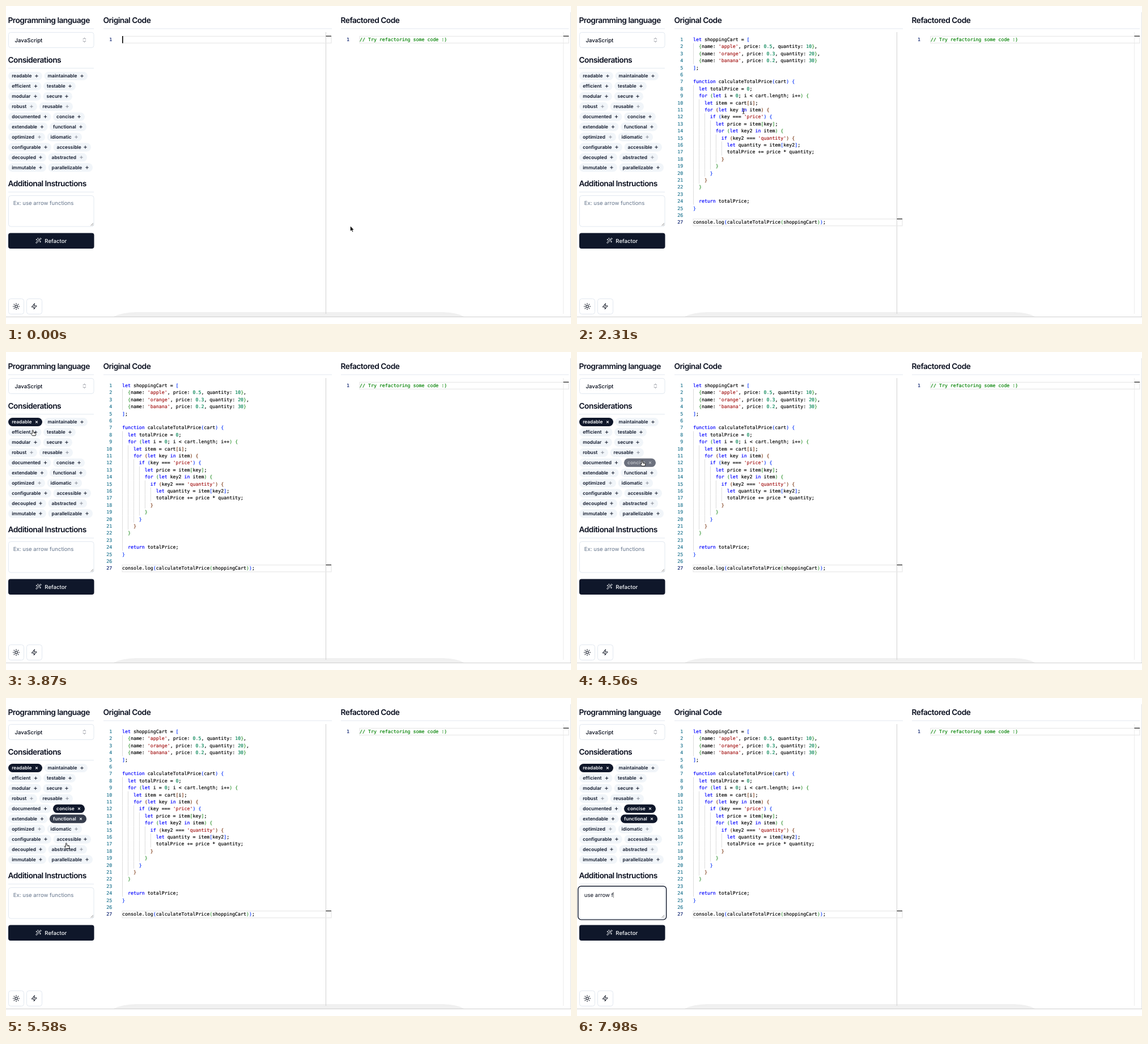
Animation of 997 by 561 pixels, one loop 8 s. Source, as an HTML page:

```html
<!DOCTYPE html>
<html lang="en">
<head>
<meta charset="utf-8">
<title>Code refactoring tool</title>
<style>
  html, body { margin: 0; width: 100%; height: 100%; overflow: hidden; background: #fff; }
  svg { display: block; }
  text { white-space: pre; text-rendering: geometricPrecision; font-family: Inter, sans-serif; }
  .head { font-size: 13.77px; font-weight: 600; letter-spacing: -.038em; fill: #0b1020; }
  .ui { font-size: 9.6px; }
  .medium { font-weight: 500; }
  .chip { font-size: 8.35px; font-weight: 600; }
  .code { font: 8.289px "DejaVu Sans Mono", monospace; font-variant-ligatures: none; }
  .code, .code tspan { fill: currentColor; stroke: currentColor; stroke-width: .18; }
  .icon { fill: none; stroke-width: 2; stroke-linecap: round; stroke-linejoin: round; }
</style>
</head>
<body>
<svg id="stage" width="997" height="561" viewBox="0 0 997 561"></svg>
<script>
const LOOP = 8000, STEP = 12.4, CHAR = 4.99;
const INK = '#0f172a', RULE = '#e2e8f0';
const stage = document.getElementById('stage');

function el(tag, attrs, parent = stage, content) {
  const node = document.createElementNS('http://www.w3.org/2000/svg', tag);
  for (const k in attrs) node.setAttribute(k, attrs[k]);
  if (content !== undefined) node.textContent = content;
  parent.appendChild(node);
  return node;
}
const text = (x, y, str, cls, fill, parent) =>
  el('text', fill ? { x, y, class: cls, fill } : { x, y, class: cls }, parent, str);
const code = (x, y, str, color, parent) =>
  el('text', { x, y, class: 'code', color }, parent, str);
const line = (x1, y1, x2, y2, stroke, w = 1, parent) =>
  el('line', { x1, y1, x2, y2, stroke, 'stroke-width': w }, parent);
const box = (x, y, width, height, rx, fill, stroke = 'none', parent) =>
  el('rect', { x, y, width, height, rx, fill, stroke }, parent);
const icon = (x, y, scale, d, stroke, opacity = 1) =>
  el('path', { d, class: 'icon', stroke, opacity, transform: `translate(${x} ${y}) scale(${scale}) translate(-12 -12)` });
const show = (node, on) => node.setAttribute('visibility', on ? 'visible' : 'hidden');
const smooth = u => { u = Math.min(1, Math.max(0, u)); return u * u * (3 - 2 * u); };
const mix = (a, b, u) => a.map((v, i) => v + (b[i] - v) * u);
const rgb = c => `rgb(${c.map(Math.round)})`;

// Window edges and the dock-like shade at the bottom
el('path', { d: 'M190 548Q205 540.5 230 540H770Q795 540.5 808 548Z', fill: '#f0f0f0' });
line(0, 548.5, 997, 548.5, '#d0d0d0');
line(996.5, 11, 996.5, 548, '#e4e4e4');

// Headings
[['Programming language', 4, 30, 155], ['Original Code', 172, 30, 575],
 ['Refactored Code', 591, 30, 993], ['Considerations', 4, 99.8, 155],
 ['Additional Instructions', 4, 318.2, 155]].forEach(([str, x, y, right]) => {
  text(x - .5, y, str, 'head');
  line(x, y + 10, right, y + 10, RULE);
});

// Language select
box(4.5, 46.5, 150.5, 27, 4, '#fff', RULE);
text(15.5, 63.6, 'JavaScript', 'ui medium', '#020817');
icon(138.3, 60, .459, 'm7 15 5 5 5-5M7 9l5-5 5 5', INK, .6);

// Consideration chips: word and centre of its plus sign, two per row
const words = [
  ['readable', 54, 'maintainable', 134], ['efficient', 52.5, 'testable', 113],
  ['modular', 52, 'secure', 107], ['robust', 45, 'reusable', 108],
  ['documented', 69.5, 'concise', 129], ['extendable', 63.5, 'functional', 132],
  ['optimized', 59, 'idiomatic', 124], ['configurable', 70, 'accessible', 140],
  ['decoupled', 61, 'abstracted', 133], ['immutable', 61, 'parallelizable', 143]];
const faint = ['robust', 'reusable', 'optimized', 'idiomatic', 'abstracted'];
// click time and moment the pointer leaves
const picks = { readable: [3450, 3740], concise: [4460, 4830], functional: [5230, 5540] };
const LIGHT = [241, 245, 249], HOVER = [63, 69, 85], DARK = [15, 23, 42], PALE = [248, 250, 252];
const chips = [];

function addChip(word, left, plus, cy) {
  const right = plus + 10;
  const pill = box(left, cy - 7.6, right - left, 15.2, 7.6, rgb(LIGHT));
  const label = text(left + 6.2, cy + 2.9, word, 'chip', INK);
  const mark = el('path', { d: 'M-2.7 0H2.7M0-2.7V2.7', stroke: INK, 'stroke-width': .95,
    opacity: faint.includes(word) ? .5 : 1 });
  chips.push({ word, left, right, plus, cy, pill, label, mark });
  return right + 3.4;
}
words.forEach(([a, pa, b, pb], i) => {
  const cy = 123.5 + 17.94 * i;
  addChip(b, addChip(a, 4, pa, cy), pb, cy);
});

function drawChip(c, t) {
  const pick = picks[c.word];
  const on = pick && t >= pick[0];
  let bg = LIGHT, fg = DARK;
  if (on) {
    const u = smooth((t - pick[0]) / 150);
    bg = mix(mix(LIGHT, HOVER, u), DARK, smooth((t - pick[1]) / 150));
    fg = mix(DARK, PALE, u);
  }
  c.pill.setAttribute('fill', rgb(bg));
  c.label.setAttribute('fill', rgb(fg));
  c.mark.setAttribute('stroke', rgb(fg));
  c.mark.setAttribute('transform', `translate(${c.plus} ${c.cy})` + (on ? ' rotate(45)' : ''));
}

// Instructions field
const ring = box(1.95, 331.95, 155.7, 59.2, 5.5, 'none', INK);
ring.setAttribute('stroke-width', 1.4);
box(4.5, 334.5, 150.5, 54.5, 4, '#fff', RULE);
el('path', { d: 'M149.5 387.5l4.5-4.5M152 387.5l2-2', stroke: '#666', 'stroke-width': .7 });
const hint = text(12.8, 351, 'Ex: use arrow functions', 'ui', '#64748b');
const typed = text(12.8, 351, '', 'ui', '#020817');
const fieldCaret = box(0, 342.5, .7, 10, 0, '#555');

// Buttons
box(4, 400.4, 151.5, 27.5, 4, INK);
icon(57.3, 414, .459, 'm21.64 3.64-1.28-1.28a1.08 1.08 0 0 0-1.54 0L2.36 18.82a1.08 1.08 0 0 0 0 1.54l1.28 1.28a1.08 1.08 0 0 0 1.54 0L21.64 5.18a1.08 1.08 0 0 0 0-1.54ZM14 7l3 3M5 6v4M19 14v4M10 2v2M7 8H3M21 16h-4M11 3H9', '#f8fafc');
text(68.3, 417.5, 'Refactor', 'ui medium', '#f8fafc');
box(4.5, 516.5, 27, 27, 4, '#fff', RULE);
box(36.5, 516.5, 27, 27, 4, '#fff', RULE);
icon(18, 530, .55, 'M8 12a4 4 0 1 0 8 0a4 4 0 1 0-8 0M12 2v2M12 20v2M4.9 4.9l1.4 1.4M17.7 17.7l1.4 1.4M2 12h2M20 12h2M6.3 17.7l-1.4 1.4M19.1 4.9l-1.4 1.4', '#020817');
icon(49.7, 530, .5, 'M13 2L3 14H12L11 22L21 10H12Z', '#020817');

// Editors
const source = `let shoppingCart = [
  {name: 'apple', price: 0.5, quantity: 10},
  {name: 'orange', price: 0.3, quantity: 20},
  {name: 'banana', price: 0.2, quantity: 30}
];

function calculateTotalPrice(cart) {
  let totalPrice = 0;
  for (let i = 0; i < cart.length; i++) {
    let item = cart[i];
    for (let key in item) {
      if (key === 'price') {
        let price = item[key];
        for (let key2 in item) {
          if (key2 === 'quantity') {
            let quantity = item[key2];
            totalPrice += price * quantity;
          }
        }
      }
    }
  }

  return totalPrice;
}

console.log(calculateTotalPrice(shoppingCart));`.split('\n');
const PAIRS = ['#0431fa', '#319331', '#7b3814'];
const token = /'[^']*'|[A-Za-z_]\w*|\d[\d.]*|[()[\]{}]|\s+|./g;
let depth = 0;

function colour(tok) {
  if (/^(let|function|for|in|if|return)$/.test(tok)) return '#0000ff';
  if (tok[0] === "'") return '#a31515';
  if (/^\d/.test(tok)) return '#098658';
  if (/^[([{]$/.test(tok)) return PAIRS[depth++ % 3];
  if (/^[)\]}]$/.test(tok)) return PAIRS[--depth % 3];
  return '#000';
}
const baseline = i => 62 + STEP * i;
function lineNumber(right, i, color, parent) {
  code(right, baseline(i), i + 1, color, parent).setAttribute('text-anchor', 'end');
}
function activeLine(x, right, ruler) {
  const g = el('g', {});
  el('rect', { x, y: 53.4, width: right - x, height: 12, fill: 'none', stroke: '#e8e8e8', 'stroke-width': 1.2 }, g);
  line(ruler, 53.2, right, 53.2, '#424242', 1.5, g);
  return g;
}

line(564.5, 46, 564.5, 543, '#d2d2d2');
line(983.5, 46, 983.5, 543, '#ececec');
const active = activeLine(205, 574, 564.5);
activeLine(624, 993, 983.5);
lineNumber(606, 0, '#0b216f');
code(624, baseline(0), '// Try refactoring some code :)', '#008000');

const empty = el('g', {});
lineNumber(187.3, 0, '#0b216f', empty);
const pasted = el('g', {});
const indent = s => s.search(/\S/) / 2;
source.forEach((row, i) => {
  lineNumber(187.3, i, i === source.length - 1 ? '#0b216f' : '#237893', pasted);
  const level = row ? indent(row) : Math.min(1, indent(source[i + 1]));
  for (let k = 0; k < level; k++) {
    const x = 205.5 + k * 2 * CHAR;
    line(x, 53 + STEP * i, x, 53 + STEP * (i + 1), '#d3d3d3', .8, pasted);
  }
  const t = code(205, baseline(i), '', '#000', pasted);
  for (const tok of row.match(token) || []) el('tspan', { color: colour(tok) }, t, tok);
});
const caret = box(205, 53, 1.6, 12.6, 0, '#000');

// Pointers, each with its hot spot at the origin
const pointers = {
  arrow: el('path', { d: 'M0 0V9.5L2.2 7.5L3.6 10.8L5.2 10.1L3.8 7H6.7Z', fill: '#000', stroke: '#fff', 'stroke-width': .7 }),
  beam: el('path', { d: 'M-1.8-4.5Q0-4.5 0-3.5Q0-4.5 1.8-4.5M0-3.5V3.5M-1.8 4.5Q0 4.5 0 3.5Q0 4.5 1.8 4.5M-1 1H1', fill: 'none', stroke: '#111', 'stroke-width': .9 }),
  hand: el('path', { d: 'M-.9 .6C-.9-.5 .9-.5 .9 .6V3.6L4.6 4.3C5.6 4.6 5.8 5.4 5.6 6.4L4.9 9.6H-.6L-3.2 6.2C-3.6 5.4-2.6 4.9-1.9 5.5L-.9 6.3ZM2.4 4.2V5.8M4 4.5V6', fill: '#fff', stroke: '#000', 'stroke-width': .8, 'stroke-linejoin': 'round' })
};
const moves = [ // start, end, destination
  [480, 1140, 365.5, 202.4], [2040, 2950, 29.5, 124], [3660, 4380, 115, 191.5],
  [4720, 5120, 115, 211], [5400, 5880, 88, 352]];

function pointerAt(t) {
  let p = [607.5, 388];
  for (const [a, b, x, y] of moves) p = mix(p, [x, y], smooth((t - a) / (b - a)));
  return p;
}
function pointerKind(x, y) {
  if (x > 195 && x < 575 && y > 46 && y < 543) return 'beam';
  if (x > 4 && x < 155 && y > 334 && y < 389) return 'beam';
  const over = c => x > c.left && x < c.right + 1 && Math.abs(y - c.cy) < 9;
  return chips.some(over) ? 'hand' : 'arrow';
}

const PASTE = 1590, FOCUS = 5920, PHRASE = 'use arrow f';
const keys = [6760, 6840, 6960, 7110, 7260, 7400, 7560, 7730, 7800, 7880, 7950];
const blink = t => t % 1000 < 500;

function draw(t) {
  const full = t >= PASTE;
  show(empty, !full);
  show(pasted, full);
  const y = full ? STEP * (source.length - 1) : 0;
  active.setAttribute('transform', `translate(0 ${y})`);
  caret.setAttribute('x', full ? 205 + CHAR * source[source.length - 1].length : 205);
  caret.setAttribute('y', 53 + y);
  show(caret, full ? t < picks.readable[0] && blink(t - PASTE) : t < 790 || t >= 1290);

  chips.forEach(c => drawChip(c, t));

  const count = keys.filter(k => t >= k).length;
  show(ring, t >= FOCUS);
  show(hint, !count);
  typed.textContent = PHRASE.slice(0, count);
  fieldCaret.setAttribute('x', 12.8 + (count ? typed.getComputedTextLength() : 0));
  show(fieldCaret, count > 0 || t >= FOCUS && blink(t - FOCUS));

  const [px, py] = pointerAt(t), kind = pointerKind(px, py);
  for (const k in pointers) {
    show(pointers[k], k === kind && !count);
    pointers[k].setAttribute('transform', `translate(${px} ${py})`);
  }
}

const start = performance.now();
function tick() {
  draw((performance.now() - start) % LOOP);
  requestAnimationFrame(tick);
}
tick();
</script>
</body>
</html>
```
